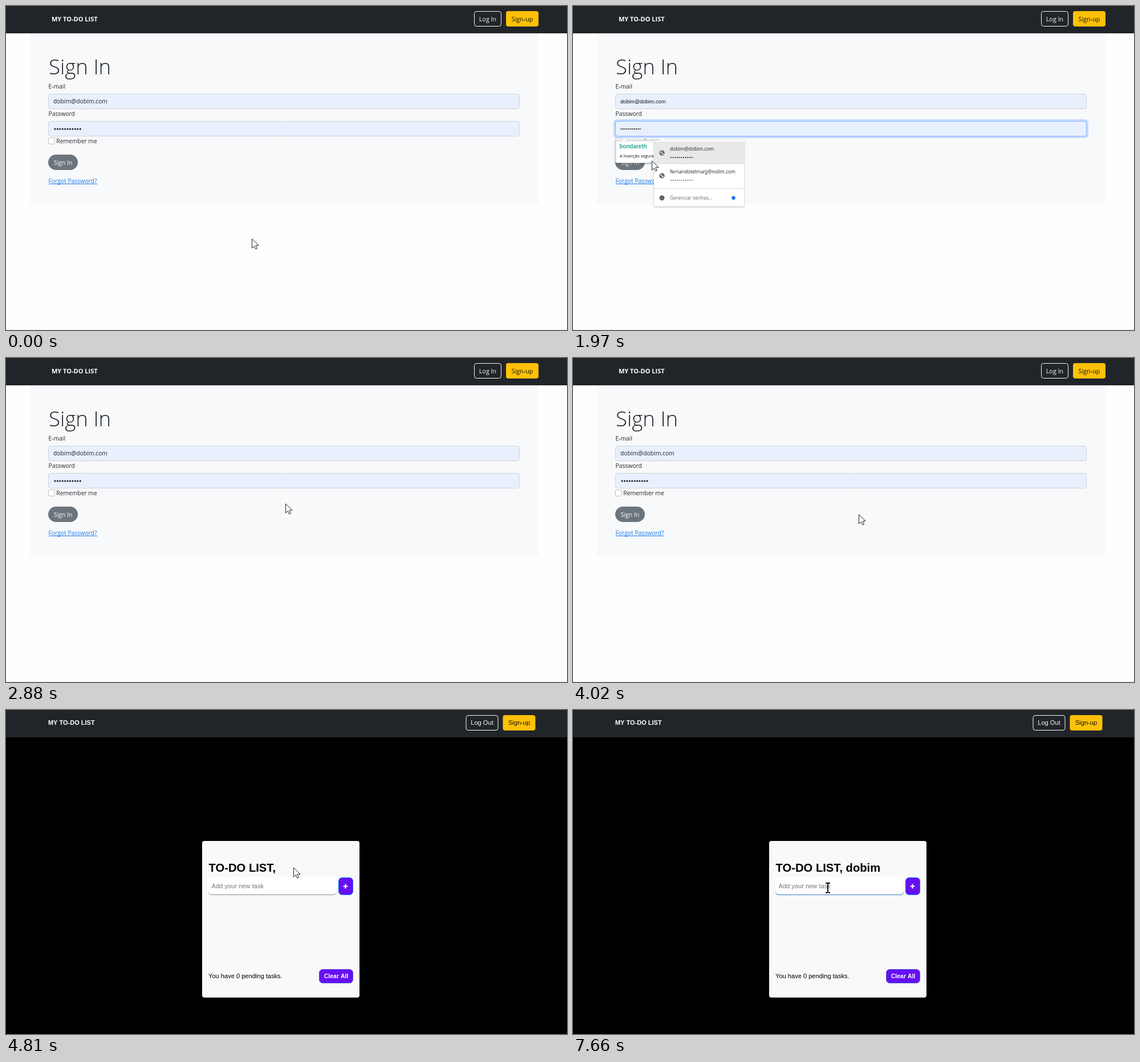
Write an HTML page with a canvas that moves like this. It is 984 by 569 pixels and loops after 8000 ms.

```html
<!DOCTYPE html>
<html lang="en">
<head>
<meta charset="utf-8">
<title>To-do list</title>
<style>
html, body { margin: 0; width: 100%; height: 100%; overflow: hidden; background: #fdfdfd; }
canvas { display: block; width: 984px; height: 569px; }
</style>
</head>
<body>
<canvas id="stage" width="984" height="569"></canvas>
<script>
const ctx = document.getElementById('stage').getContext('2d');
const LOOP = 8000, STEP = 75.5;
const UI = '"Open Sans", "Noto Sans", sans-serif';
const ARIAL = '"Liberation Sans", Arial, sans-serif';
const INK = '#212529', VIOLET = '#6610f2';
const USER = 'dobim', MAIL = USER + '@' + USER + '.com';

// Pointer moves: where each one ends, when it runs, and how far it bows sideways
const moves = [
  { from: 60, to: 800, x: 204, y: 229, bow: -12 },
  { from: 800, to: 960, x: 226, y: 210 },
  { from: 1100, to: 1190, x: 230, y: 210 },
  { from: 1500, to: 1963, x: 138, y: 272 },
  { from: 1963, to: 2290, x: 330, y: 261 },
  { from: 2290, to: 2869, x: 490, y: 256 },
  { from: 2869, to: 3400, x: 501, y: 275, bow: -10 },
  { from: 3980, to: 4340, x: 504, y: 277 },
  { from: 5030, to: 5350, x: 571, y: 268, bow: 34 },
  { from: 5350, to: 5810, x: 392, y: 328, bow: 58 },
  { from: 5920, to: 6030, x: 447, y: 312 }
];

const clamp = v => Math.max(0, Math.min(1, v));
const smooth = k => k * k * (3 - 2 * k);

function pointer(t) {
  const q = Math.floor((t + 12) / STEP) * STEP;
  let x = 431, y = 409;
  for (const m of moves) {
    if (q <= m.from) break;
    const k = smooth(clamp((q - m.from) / (m.to - m.from)));
    const dx = m.x - x, dy = m.y - y;
    const side = (m.bow || 0) * Math.sin(Math.PI * k) / Math.hypot(dx, dy);
    x += dx * k + dy * side;
    y += dy * k - dx * side;
  }
  return [x, y];
}

function rect(x, y, w, h, fill) {
  ctx.fillStyle = fill;
  ctx.fillRect(x, y, w, h);
}

function box(x, y, w, h, r, fill, line) {
  const o = line ? 0.5 : 0;
  ctx.beginPath();
  ctx.roundRect(x + o, y + o, w - 2 * o, h - 2 * o, r);
  if (fill) { ctx.fillStyle = fill; ctx.fill(); }
  if (line) { ctx.strokeStyle = line; ctx.lineWidth = 1; ctx.stroke(); }
}

function text(s, x, y, size, color, font = UI, weight = 400, align = 'left') {
  ctx.font = `${weight} ${size}px ${font}`;
  ctx.textAlign = align;
  ctx.fillStyle = color;
  ctx.fillText(s, x, y);
}

const centered = (s, x, y, size, color, font, weight = 400) =>
  text(s, x, y, size, color, font, weight, 'center');

function disc(x, y, r, color) {
  ctx.fillStyle = color;
  ctx.beginPath();
  ctx.arc(x, y, r, 0, Math.PI * 2);
  ctx.fill();
}

function dots(x, y, gap, r, color) {
  for (let i = 0; i < 11; i++) disc(x + i * gap, y, r, color);
}

function shadowed(draw) {
  ctx.save();
  ctx.shadowColor = 'rgba(0,0,0,.3)';
  ctx.shadowBlur = 3;
  ctx.shadowOffsetY = 1;
  draw();
  ctx.restore();
}

function header(dx, font, size, label, left) {
  const base = dx ? 26.2 : 27;
  rect(0, 0, 984, 48, INK);
  text('MY TO-DO LIST', 80 + dx * 1.1, base, 11, '#fff', font, 700);
  box(left + dx, 9, 869 - left, 27, 4, null, '#f8f9fa');
  centered(label, (left + 869) / 2 + dx, base, size, '#f8f9fa', font);
  box(877 + dx, 9, 57, 27, 4, '#ffc107');
  centered('Sign-up', 905.5 + dx, base, size, '#111', font);
}

function notch(x, line) {
  ctx.beginPath();
  ctx.moveTo(x - 6, 236.5);
  ctx.lineTo(x, 230.5);
  ctx.lineTo(x + 6, 236.5);
  ctx.fillStyle = '#fff';
  ctx.fill();
  if (line) { ctx.strokeStyle = line; ctx.lineWidth = 1; ctx.stroke(); }
}

function globe(x, y) {
  disc(x, y, 4.6, '#5f6368');
  disc(x - 1.5, y - 1.3, 1.5, '#e8e8e8');
  disc(x + 1.3, y + 1.5, 1.6, '#e8e8e8');
}

function account(mail, y, dotColor) {
  globe(156, y);
  text(mail, 170, y - 4, 8.4, '#222');
  dots(171.8, y + 8, 3.7, 1.1, dotColor);
}

function popups(hover) {
  shadowed(() => box(74, 235, 80, 41, 2, '#fff', '#c9cccf'));
  notch(90, '#c9cccf');
  text('bondareth', 81.5, 250, 9.7, '#23a08c', 'Inter, sans-serif', 600);
  text('A Inserção segura', 82, 266, 7.2, '#111', UI, 500);

  shadowed(() => box(142, 236, 158, 116, 2, '#fff'));
  notch(157.5);
  if (hover) rect(142, 238, 158, 40, '#e8e8e8');
  account(MAIL, 258, '#222');
  account('fernandotelmarjj@nolim.com', 298, '#777');
  rect(142, 320, 158, 1, '#dadce0');
  disc(156, 337, 4.5, '#5f6368');
  text('Gerenciar senhas...', 170, 340, 8.4, '#666');
  disc(281.5, 337, 3.2, '#1a73e8');
}

function signIn(t) {
  const open = t >= 1490 && t < 2430;
  const preview = t >= 1640 && t < 2200;
  box(42, 40, 892, 308, 4, '#f8f9fa');
  header(0, UI, 10.8, 'Log In', 821);
  text('Sign In', 75, 120, 36.6, INK, UI, 300);

  if (open) box(71, 199, 833, 33, 6, '#c2d9fe');
  ['E-mail', 'Password'].forEach((label, i) => {
    const y = 154 + 48 * i;
    text(label, 74.5, y - 9.3, 10.3, INK);
    box(74, y, 827, 27, 4, '#e8f0fe', open && i ? '#86b7fe' : '#ced4da');
  });
  if (preview) {
    text(MAIL, 83, 171.3, 9.2, '#111', ARIAL);
    dots(84.6, 216, 3.3, 1.1, '#111');
  } else {
    text(MAIL, 83, 171.3, 10.3, INK);
    dots(86, 216, 4.42, 1.5, '#111');
  }

  box(74, 231, 12, 12, 2.5, '#fff', '#bfbfbf');
  text('Remember me', 88.3, 241, 10.3, INK);
  box(74, 261, 52, 27, 13.5, '#6c757d');
  centered('Sign In', 100, 279, 10.5, '#fff', UI);
  text('Forgot Password?', 74.5, 311, 10.35, '#1a7af0');
  rect(75, 312, 85, 1, '#1a7af0');
  if (open) popups(preview);
}

function todo(t) {
  const focus = smooth(clamp((t - 6060) / 150));
  const caret = (t >= 6140 && t < 6670) || (t >= 7200 && t < 7660);
  rect(0, 0, 984, 569, '#000');
  header(-5.5, ARIAL, 11.1, 'Log Out', 812);
  box(344, 230, 276, 275, 4, '#f9f9f9');
  text('TO-DO LIST,' + (t >= 4870 ? ' ' + USER : ''), 355.6, 283.5, 20.2, '#000', ARIAL, 700);

  // Underline blends from grey to blue on focus
  box(355, 294, 225, 31, 6, '#888');
  ctx.globalAlpha = focus;
  box(355, 294, 225, 31, 6, '#3c78be');
  ctx.globalAlpha = 1;
  box(355, 293, 225, 31, 6, '#fff');
  text('Add your new task', 360.5, 312.5, 11.1, '#757575', ARIAL);
  if (caret) rect(361, 303, 1, 12, '#000');

  box(583, 294, 26, 31, 6, VIOLET, '#0d6efd');
  rect(591.5, 308.6, 8, 2, '#fff');
  rect(594.5, 305.6, 2, 8, '#fff');
  text('You have 0 pending tasks.', 355, 470.7, 11.1, '#000', ARIAL);
  box(549, 455, 60, 25, 6, VIOLET, '#5f5ad8');
  centered('Clear All', 579, 471, 10.5, '#fff', ARIAL, 700);
}

function arrow(x, y) {
  ctx.save();
  ctx.translate(x + 0.5, y);
  const shape = new Path2D('M0 0V16.2L3.8 12.6 6.5 18.2 9 17 6.4 11.6 11.6 11.3Z');
  ctx.fillStyle = '#fff';
  ctx.fill(shape);
  ctx.strokeStyle = '#222';
  ctx.lineWidth = 1;
  ctx.stroke(shape);
  ctx.restore();
}

function beam(x, y, half) {
  x = Math.round(x);
  y = Math.round(y);
  rect(x - 1, y - half, 2, 2 * half, '#111');
  for (const end of [y - half, y + half - 1]) {
    rect(x - 4, end, 3, 2, '#111');
    rect(x + 1, end, 3, 2, '#111');
  }
}

function cursor(t) {
  const [x, y] = pointer(t);
  const inside = (l, top, r, b) => x > l && x < r && y > top && y < b;
  if (t < 4600 && inside(74, 202, 901, 228)) beam(x, y, 8);
  else if (t >= 4810 && inside(355, 294, 580, 325)) beam(x, y, 9);
  else arrow(x, y);
}

function frame() {
  const t = performance.now() % LOOP;
  rect(0, 0, 984, 569, '#fefefe');
  rect(0, 568, 984, 1, '#ededed');
  if (t < 4600) signIn(t);
  else if (t < 4810) header(0, UI, 10.8, 'Log Out', 812);
  else todo(t);
  cursor(t);
  requestAnimationFrame(frame);
}
frame();
</script>
</body>
</html>
```
